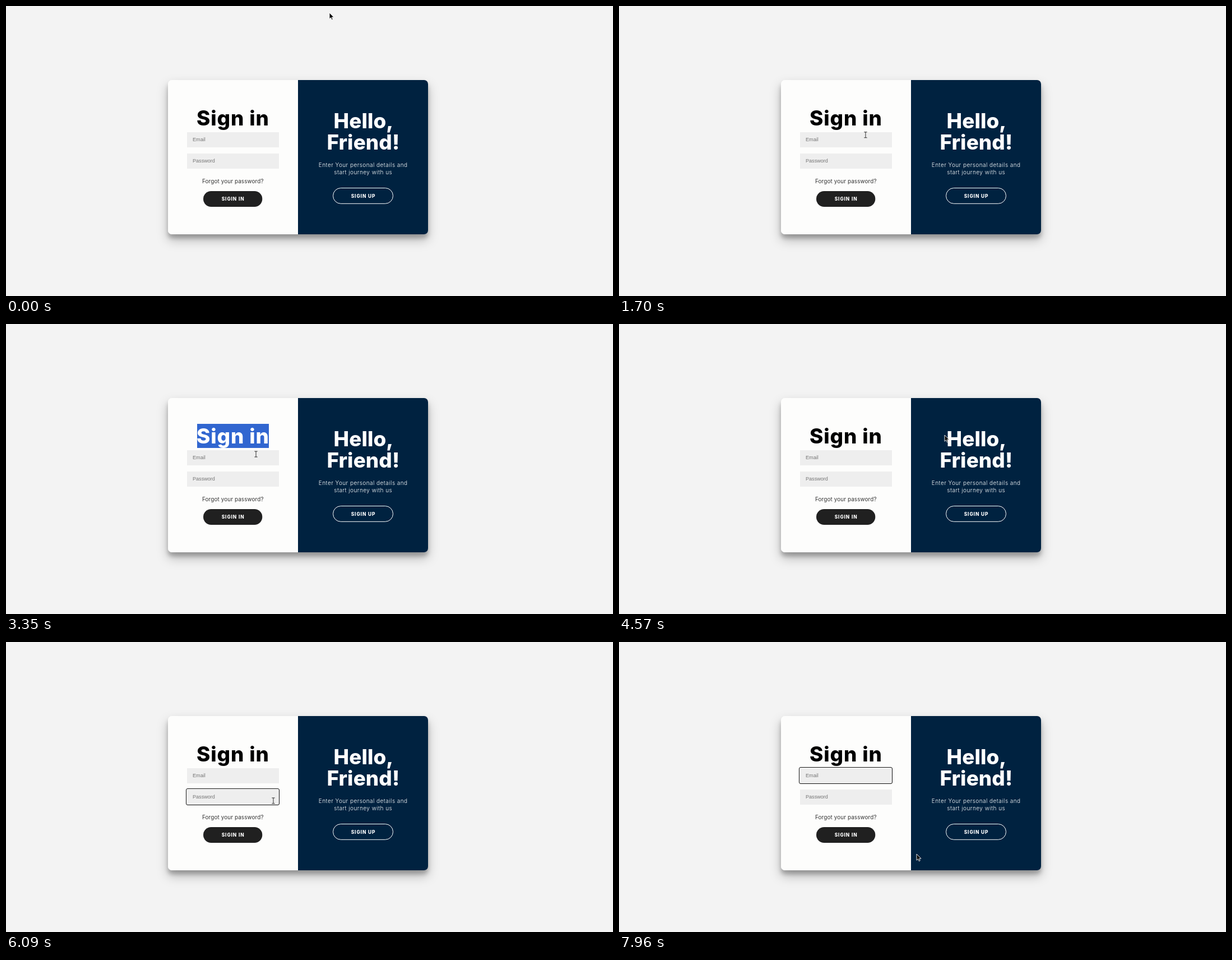
These frames come from a looping animation (1083x517 px, 8 s). An HTML page:

```html
<!DOCTYPE html>
<html lang="en">
<head>
<meta charset="utf-8">
<title>Sign in form</title>
<style>
  html, body { margin: 0; width: 100%; height: 100%; overflow: hidden; background: #f3f3f3; }
  .card {
    position: absolute; left: 288.7px; top: 132.4px; width: 464.7px; height: 274.2px; border-radius: 7px;
    background: linear-gradient(90deg, #fdfdfc 50%, #002240 50%);
    box-shadow: 0 10px 20px rgba(0,0,0,.25), 0 7px 7px rgba(0,0,0,.22);
  }
  svg { position: absolute; left: 0; top: 0; display: block; }
  text { font-family: Inter, sans-serif; text-anchor: middle; }
  .h { font-size: 36.8px; font-weight: 800; letter-spacing: .1px; }
  .title { letter-spacing: .9px; }
  .p { font-size: 10px; font-weight: 300; letter-spacing: .46px; fill: #fff; }
  .link { font-size: 9.9px; letter-spacing: .12px; fill: #333; }
  .btn { font-size: 8.4px; font-weight: 800; letter-spacing: .9px; fill: #fff; }
  .hint { font: 9.1px "Liberation Sans", Arial, sans-serif; text-anchor: start; fill: #757575; }
</style>
</head>
<body>
<div class="card"></div>
<svg width="1083" height="517" viewBox="0 0 1083 517">
  <clipPath id="picked"><rect id="clip" x="341" y="178" width="0" height="43"/></clipPath>

  <text class="h title hover" id="title" x="405" y="212.5">Sign in</text>
  <rect id="mark" x="341" y="178" width="0" height="43" fill="#3166d0"/>
  <text class="h title" x="405" y="212.5" fill="#fff" clip-path="url(#picked)">Sign in</text>

  <rect class="hover" x="323" y="225" width="164" height="27" fill="#eee"/>
  <rect class="hover" x="323" y="263" width="164" height="27" fill="#eee"/>
  <text class="hint" x="333" y="241.4">Email</text>
  <text class="hint" x="333" y="279.2">Password</text>
  <g id="focus">
    <rect x="321.5" y="223.5" width="166" height="29" rx="2.5" fill="none" stroke="#101010"/>
    <rect id="caret" x="333" y="233" width="1" height="10.5" fill="#111"/>
  </g>

  <text class="link hover" x="404.8" y="315.5">Forgot your password?</text>
  <rect x="352" y="330" width="105.3" height="28" rx="14" fill="#202020"/>
  <text class="btn" x="405.1" y="347">SIGIN IN</text>

  <g fill="#fff">
    <text class="h hover" x="638" y="217.5">Hello,</text>
    <text class="h hover" x="637.3" y="256">Friend!</text>
  </g>
  <text class="p hover" x="637.2" y="286.7">Enter Your personal details and</text>
  <text class="p hover" x="637.2" y="300.4">start journey with us</text>
  <rect x="583.5" y="324.5" width="107" height="27.8" rx="13.9" fill="none" stroke="#fff"/>
  <text class="btn" x="637.5" y="341.6">SIGIN UP</text>

  <path id="arrow" d="M0 0V11.2L2.6 8.8L4.3 12.7L6.2 11.9L4.5 8.1H8Z"
    fill="#080808" stroke="#fff" stroke-width=".9" stroke-linejoin="round"/>
  <g id="beam" fill="none">
    <path d="M-2.7 -5H2.7M0 -5V5M-2.7 5H2.7" stroke="#fff" stroke-opacity=".8" stroke-width="2.2"/>
    <path d="M-2.7 -5H2.7M0 -5V5M-2.7 5H2.7" stroke="#222"/>
  </g>
</svg>
<script>
const LOOP = 8000;
const SELECT = 2800, SELECTED = 3270, DESELECT = 3950;
const FOCUS_PASSWORD = 5330, FOCUS_EMAIL = 7150;
const MARK_X = 341, MARK_WIDTH = 128;

const get = id => document.getElementById(id);
const clamp = (v, lo, hi) => Math.min(hi, Math.max(lo, v));
const show = (id, on) => get(id).style.display = on ? "" : "none";

// Key points of the pointer's path; a repeated point is a rest.
const path = [
  { t: 0, x: 577, y: 12 },
  { t: 500, x: 200, y: 235 },
  { t: 1090, x: 455, y: 497 },
  { t: 1700, x: 440, y: 230 },
  { t: 2520, x: 364, y: 199 },
  { t: SELECT, x: 341, y: 200 },
  { t: 3330, x: 446, y: 232 },
  { t: 3520, x: 446, y: 232 },
  { t: 3700, x: 490, y: 187 },
  { t: 3910, x: 490, y: 187 },
  { t: 4570, x: 581, y: 198 },
  { t: FOCUS_PASSWORD, x: 440, y: 274 },
  { t: 6090, x: 477, y: 283 },
  { t: 6850, x: 402, y: 150 },
  { t: 7430, x: 450, y: 243 },
  { t: 7650, x: 450, y: 243 },
  { t: 7960, x: 531, y: 378 }
];

const still = (p, q) => p.x === q.x && p.y === q.y;

function slope(i, axis) {
  const a = path[i - 1], b = path[i], c = path[i + 1];
  if (!a || !c || still(a, b) || still(b, c)) return 0;
  return (c[axis] - a[axis]) / (c.t - a.t);
}

// Smooth curve through the key points
function pointer(t, axis) {
  const next = path.findIndex(p => p.t > t);
  const i = next < 0 ? path.length - 2 : next - 1;
  const a = path[i], b = path[i + 1], d = b.t - a.t;
  const u = clamp((t - a.t) / d, 0, 1), v = 1 - u;
  return v * v * (1 + 2 * u) * a[axis] + u * u * (3 - 2 * u) * b[axis] +
    d * u * v * (v * slope(i, axis) - u * slope(i + 1, axis));
}

// The selection grows letter by letter and then takes the whole line.
function selectionWidth(t, x) {
  if (t < SELECT || t >= DESELECT) return 0;
  if (t >= SELECTED) return MARK_WIDTH;
  const title = get("title");
  let end = MARK_X;
  for (let i = 0; i < title.getNumberOfChars(); i++) {
    const box = title.getExtentOfChar(i);
    if (x > box.x + box.width / 2) end = box.x + box.width;
  }
  return clamp(end - MARK_X, 0, MARK_WIDTH);
}

const hoverAreas = [...document.querySelectorAll(".hover")];

function isOverText(x, y) {
  return hoverAreas.some(el => {
    const b = el.getBBox();
    return x >= b.x && x <= b.x + b.width && y >= b.y && y <= b.y + b.height;
  });
}

function draw(t) {
  const x = pointer(t, "x"), y = pointer(t, "y");
  const overText = isOverText(x, y);
  for (const id of ["arrow", "beam"]) get(id).setAttribute("transform", `translate(${x} ${y})`);
  show("arrow", !overText);
  show("beam", overText);

  const width = selectionWidth(t, x);
  for (const id of ["mark", "clip"]) get(id).setAttribute("width", width);

  const onEmail = t >= FOCUS_EMAIL;
  const since = t - (onEmail ? FOCUS_EMAIL : FOCUS_PASSWORD);
  get("focus").setAttribute("transform", `translate(0 ${onEmail ? 0 : 38})`);
  show("focus", since >= 0);
  show("caret", since % 1000 < 500);
}

const start = performance.now();
function tick() {
  draw((performance.now() - start) % LOOP);
  requestAnimationFrame(tick);
}
tick();
</script>
</body>
</html>
```
